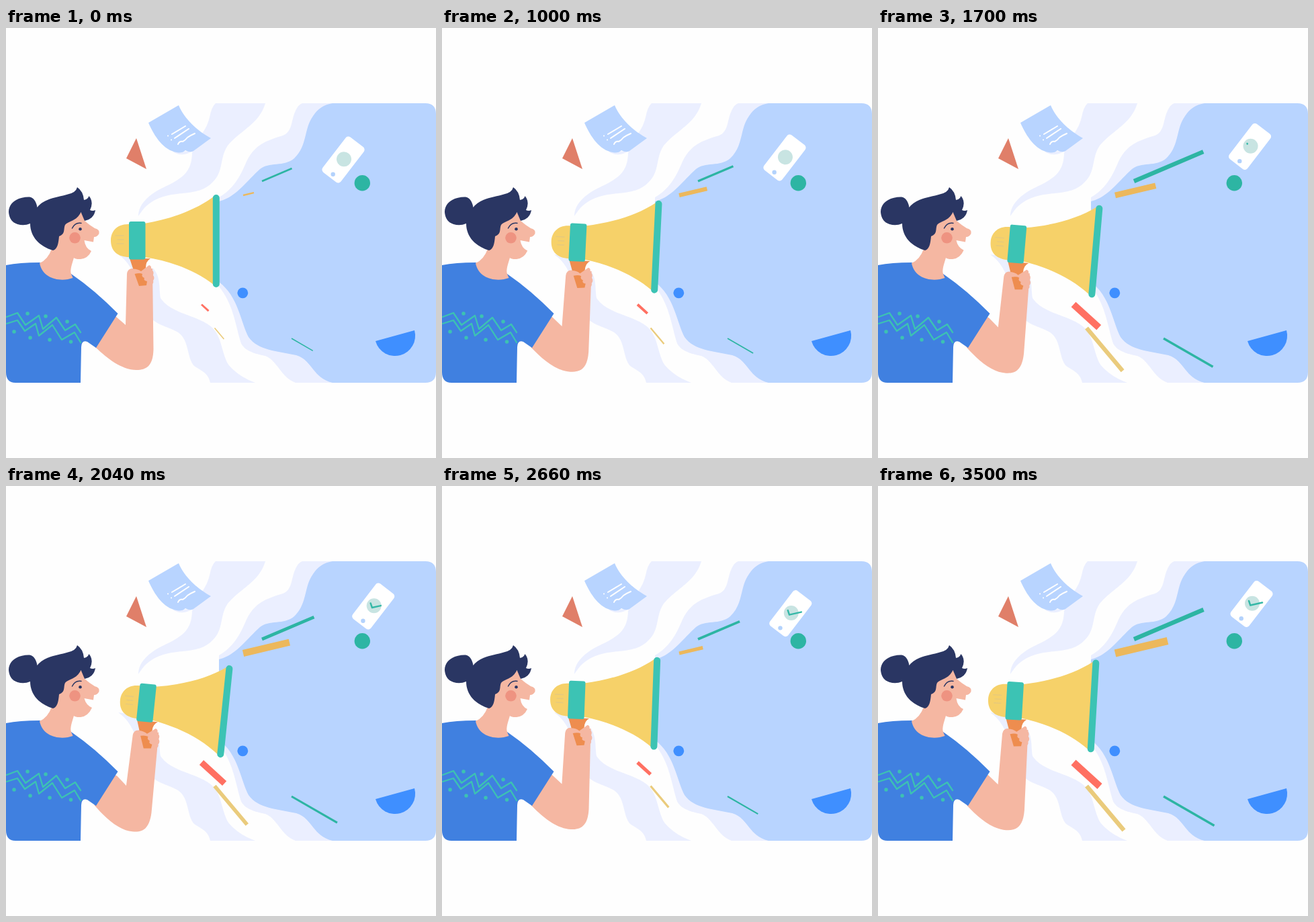
These frames come from a looping animation (640 by 640 pixels, 3.52 s). An HTML page:

```html
<!DOCTYPE html>
<html lang="en">
<head>
<meta charset="utf-8">
<title>Megaphone</title>
<style>
html, body { margin: 0; height: 100%; overflow: hidden; background: #fefefe; }
svg { display: block; width: 640px; height: 640px; }
.pale { fill: #ebefff; }
.sky { fill: #b8d4ff; }
.teal { fill: #3cc3b4; }
.skin { fill: #f5b7a2; }
.hair { fill: #2a3663; }
.yellow { fill: #f6d169; }
.orange { fill: #ee8d4f; }
.line { fill: none; stroke-linecap: round; stroke-linejoin: round; }
</style>
</head>
<body>
<svg viewBox="0 0 640 640">
  <g class="pale">
    <path d="M312 112H386C377 143 349 152 330 175C317 194 325 214 306 231C287 249 262 243 234 251C215 257 206 266 197 280C197 262 213 247 237 236C262 224 276 215 277 187C279 168 297 158 303 133Q306 117 312 112Z"/>
    <path d="M167 337C185 340 202 342 213 351C232 368 227 384 230 402C246 426 285 427 306 445C322 460 320 482 331 501Q346 519 371 528H304C301 513 290 510 280 503C269 491 273 464 256 453C243 445 225 443 213 429C197 400 198 358 167 337Z"/>
    <path d="M317 252C338 240 348 222 357 201C369 174 387 168 409 161C427 157 424 137 431 123Q435 114 441 112H490V528H431C409 520 405 496 386 488C366 484 351 479 348 463C341 438 337 409 317 385Z"/>
  </g>
  <path class="sky" d="M486 112H624Q640 112 640 128V512Q640 528 624 528H486C456 521 456 494 432 487C404 481 375 480 361 460C349 437 346 400 317 378V258C342 252 357 229 378 210C391 199 414 207 429 194C449 175 443 150 457 131Q467 115 486 112Z"/>

  <path class="pale" d="M248 184Q262 193 278 183Z"/>
  <path class="sky" d="M212 141L257 115C266 136 285 153 305 164L279 183Q274 186 267 182Q262 187 254 185C235 182 221 162 212 141Z"/>
  <path class="line" stroke="#fff" stroke-width="2" d="M247 158L267 146M251 164L272 150M256 173Q258 168 263 169Q267 167 270 163Q274 160 281 157M241 160.5h.1M246 166.5h.1"/>
  <path fill="#e07f69" d="M194 164L209 210L179 194Z"/>
  <path fill="#3f8fff" d="M550 466L608 450A30 30 0 0 1 550 466Z"/>
  <circle fill="#3f8fff" cx="352.3" cy="394.3" r="7.9"/>

  <g id="phone">
    <rect x="-17" y="-33" width="34" height="66" rx="5" fill="#fff" transform="translate(502 196) rotate(37.5)"/>
    <circle cx="503" cy="195.3" r="11" fill="#c8e4e2"/>
    <circle cx="486.7" cy="217.7" r="3.2" fill="#b3d2fc"/>
    <path id="check" class="line" stroke="#35b8a7" stroke-width="2.5" stroke-dasharray="0 99" d="M498 191.5L500.2 198L518 194"/>
  </g>
  <circle fill="#2db5a3" cx="530.3" cy="230.7" r="11.7"/>
  <g id="bars"></g>

  <g id="arm">
    <path class="skin" d="M150 425L163 429L178 442L180 366Q181 357 190 358H218L219.500 478C219 503 209 509 194 509C172 509 150 491 134 476L126 462Z"/>
    <path fill="#fefefe" d="M203 340H226V358H203Z"/>
    <path class="orange" d="M184 343H215Q208 347 208 357L204 364H191Z"/>
    <path class="skin" d="M184 359Q194 357 201 362L213 353Q217 354 216 359Q221 362 219 368Q222 372 219 376Q221 381 214 383L200 384L182 372Z"/>
    <path class="orange" d="M191.500 366Q199 364 203 366Q201 370 206 372Q204 376 210 377L209 383L198 384Z"/>
    <path class="yellow" d="M184 292C165 291 156 303 156 316C156 332 166 341 184 341ZM206 291C246 284 282 271 309 251V382C282 361 246 347 206 341Z"/>
    <path class="line" stroke="#e6c97c" stroke-width="1.400" d="M163 309H175M166 315H175M165 321H175"/>
    <rect class="teal" x="183" y="288" width="24.500" height="56.500" rx="3"/>
    <rect class="teal" x="307.800" y="248" width="10" height="138" rx="5"/>
  </g>

  <path fill="#4080e0" d="M0 353Q20 349 50 349L97 366Q132 390 166.500 425L134 476L121 467Q112.500 464 112 475L111 528H14Q0 528 0 512Z"/>
  <g class="line" stroke="#3cc2b2" stroke-width="2.300">
    <path d="M1 430L17 424L29 442L49 428L55 448L75 431L88 450L103 441L111 453"/>
    <path d="M1 440L17 435L28 451L44 440L49 458L69 442L83 464L102 453L111 468"/>
    <path stroke-width="5.400" d="M32 425h.1M59 429h.1M91 437h.1M12 452h.1M36 461h.1M65 464h.1M96.500 467h.1"/>
  </g>
  <path id="face" class="skin"/>
  <path class="hair" d="M4 274C4 259 19 251 35 251.500Q44 253 46.500 267C57 253 78 252 92 247.500Q104 245 106 237Q115 243 116 256Q122 255 123.500 250Q131 259 125 271Q129 273 133 271Q131 284 117 287L111.500 274C105 288 93 287 88 293C85 300 89 306 79 310C78 320 77 329 70 331C50 325 36 311 36 291Q27 295 17 292Q5 288 4 274Z"/>
  <path class="line" stroke="#2a3663" stroke-width="1.500" d="M98.500 298Q103 289 112 290.500"/>
  <circle class="hair" cx="110.500" cy="299.300" r="2.300"/>
  <circle fill="#ee9381" cx="102.500" cy="312.300" r="8.300"/>
</svg>
<script>
const LOOP = 3520;
const byId = id => document.getElementById(id);

// Keys are [time, value] pairs, eased in and out between neighbours.
const swing = [[0, 0], [620, 1], [1300, 0], [1920, 1], [2420, 0], [3070, 1], [3920, 0]];
const pulse = swing.slice(0, 6);
const burst = [[0, 0], [690, 1], [1100, 0], [1790, 1], [1905, 1], [2420, 0], [3070, 1]];
const early = [[0, 0], [570, 1], [1130, 0], [1727, 1], [2408, 0], [3108, 1]];
const talk = [[0, 0], [560, 1], [1200, 0], [2040, 1], [2340, 0]];
const draw = [[1650, 0], [2200, 1]];

function valueAt(keys, t) {
  const i = keys.findIndex(key => key[0] > t);
  if (i < 0) return keys[keys.length - 1][1];
  if (i === 0) return keys[0][1];
  const [t0, a] = keys[i - 1], [t1, b] = keys[i];
  const u = (t - t0) / (t1 - t0);
  return a + (b - a) * u * u * (3 - 2 * u);
}

// x, y, dx, dy, width, colour, smallest scale, keys
const bars = [
  [381, 228, 103.500, -44, 6.300, '#2db5a3', .43, early],
  [353, 249, 78, -18.500, 11.500, '#ecb85c', .205, pulse],
  [291, 411.500, 39, 35.500, 10.500, '#ff7062', .27, burst],
  [310.500, 446.500, 55.500, 66, 6.500, '#eacb7c', .25, burst],
  [425, 462, 75.500, 43.500, 3.500, '#2db5a3', .42, burst]
].map(([x, y, dx, dy, width, colour, min, keys]) => {
  const node = document.createElementNS('http://www.w3.org/2000/svg', 'path');
  node.setAttribute('d', `M0 0L${dx} ${dy}`);
  node.setAttribute('stroke', colour);
  node.setAttribute('stroke-width', width);
  byId('bars').append(node);
  return { node, x, y, min, keys };
});

function render(t) {
  for (const { node, x, y, min, keys } of bars) {
    const scale = min + (1 - min) * valueAt(keys, t);
    node.setAttribute('transform', `translate(${x} ${y}) scale(${scale})`);
  }
  byId('arm').setAttribute('transform', `rotate(${6.900 * valueAt(swing, t)} 139 453)`);

  const fly = valueAt(burst, t);
  byId('phone').setAttribute('transform', `translate(${54 * fly} ${-20.500 * fly})`);
  const drawn = valueAt(draw, t);
  byId('check').setAttribute('stroke-dasharray', `${25.200 * drawn} 99`);
  byId('check').style.visibility = drawn ? 'visible' : 'hidden';

  const shut = valueAt(talk, t);
  byId('face').setAttribute('d', `M75 290L111 274Q115 277 117 287Q125 294 132 298Q140 300 138.500 306Q136 311 131 311L130 318.500L116.500 316
    Q${118 + shut} ${328 - 2 * shut} ${127 + shut} ${332 - 2 * shut}Q122 343 111 344Q104 344.500 101 342C98 352 95 360 97 366L99.500 372C83 378 55 375 50 350Q62 345 68 329Z`);
}

function tick() {
  render(performance.now() % LOOP);
  requestAnimationFrame(tick);
}
tick();
</script>
</body>
</html>
```
